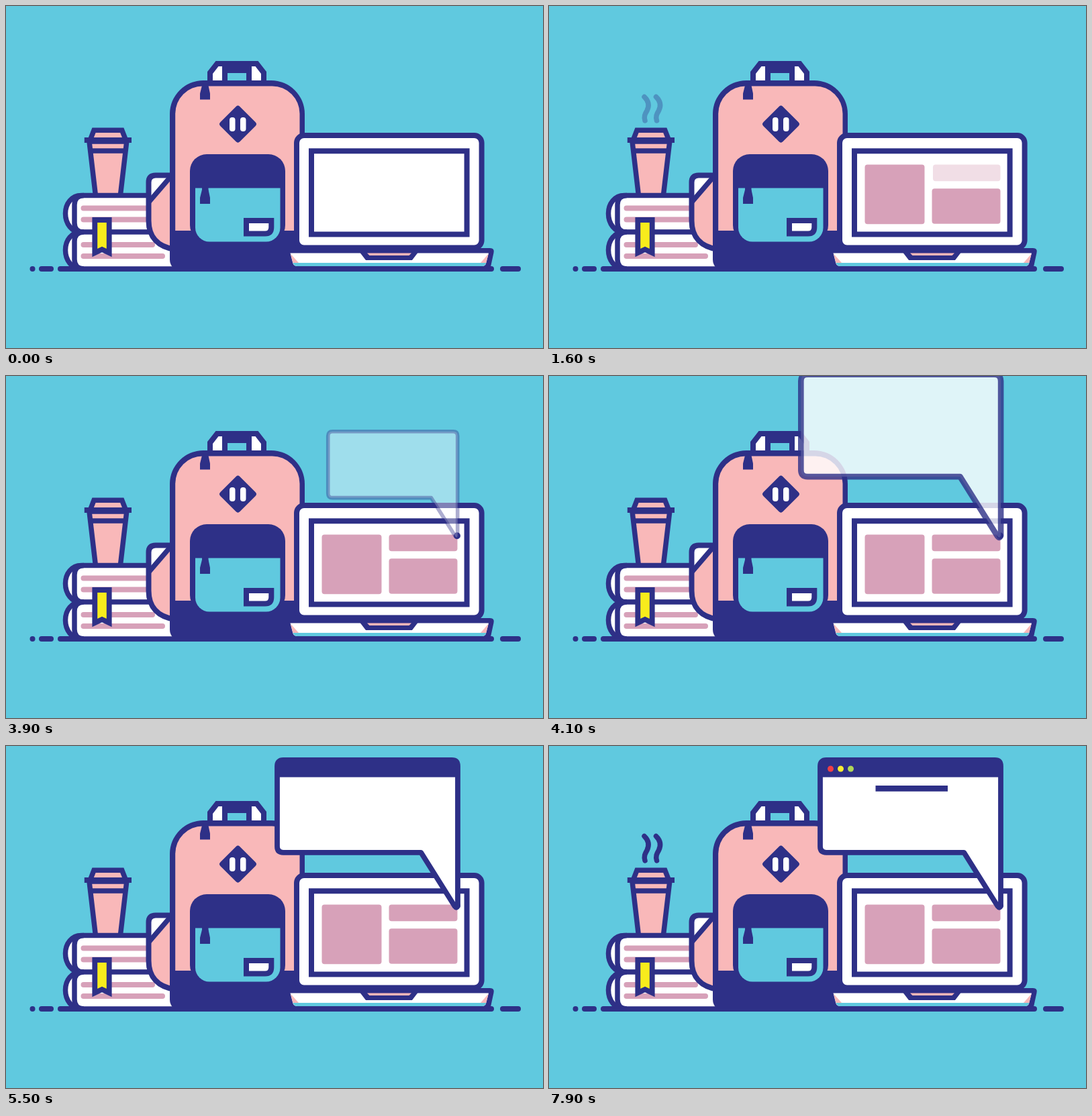
These frames come from a looping animation (800x510 px, 8000 ms). An HTML page with a canvas:

```html
<!DOCTYPE html>
<html lang="en">
<head>
<meta charset="utf-8">
<title>Study desk</title>
<style>
html, body { margin: 0; width: 100%; height: 100%; overflow: hidden; background: #60c9df; }
canvas { display: block; }
</style>
</head>
<body>
<canvas id="stage" width="800" height="510"></canvas>
<script>
const ctx = document.getElementById('stage').getContext('2d');
const LOOP = 8000, STEP = 100;
const SKY = '#60c9df', NAVY = '#2e3087', PINK = '#f9b8b9', MAUVE = '#d7a1b9',
      WHITE = '#fff', YELLOW = '#f8ec1c';

// ---- drawing helpers ----
function shape(d, fill, stroke, width = 8, join = 'miter', cap = 'butt') {
  const p = new Path2D(d);
  if (fill) { ctx.fillStyle = fill; ctx.fill(p); }
  if (stroke) {
    ctx.strokeStyle = stroke;
    ctx.lineWidth = width;
    ctx.lineJoin = join;
    ctx.lineCap = cap;
    ctx.stroke(p);
  }
}

function box(x, y, w, h, r, fill, stroke, width = 8) {
  ctx.beginPath();
  ctx.roundRect(x, y, w, h, r);
  if (fill) { ctx.fillStyle = fill; ctx.fill(); }
  if (stroke) {
    ctx.strokeStyle = stroke;
    ctx.lineWidth = width;
    ctx.lineJoin = 'miter';
    ctx.stroke();
  }
}

function disc(x, y, r, fill) {
  ctx.beginPath();
  ctx.arc(x, y, r, 0, Math.PI * 2);
  ctx.fillStyle = fill;
  ctx.fill();
}

function bar(x1, x2, y, color, width = 8, cap = 'round') {
  shape(`M${x1} ${y}H${x2}`, null, color, width, 'round', cap);
}

// ---- timing helpers ----
const ramp = (t, start, dur) => Math.min(1, Math.max(0, (t - start) / dur));
const ease = (t, start, dur) => {
  const u = ramp(t, start, dur);
  return u * u * (3 - 2 * u);
};
// Grow from 0 to peak, then settle at 1.
const pop = (t, start, up, down, peak) =>
  peak * ease(t, start, up) - (peak - 1) * ease(t, start + up, down);

// Scale around (x, y) with some opacity.
function scaled(x, y, sx, sy, alpha, draw) {
  if (alpha <= 0 || sx <= 0 || sy <= 0) return;
  ctx.save();
  ctx.globalAlpha = alpha;
  ctx.translate(x, y);
  ctx.scale(sx, sy);
  ctx.translate(-x, -y);
  draw();
  ctx.restore();
}

// ---- still objects ----
function ground() {
  disc(39.5, 392, 4, NAVY);
  bar(53, 67, 392, NAVY);
  bar(81, 723, 392, NAVY);
  bar(740, 763, 392, NAVY);
}

function cup() {
  shape('M124 202L133.6 284H170.2L179.8 202Z', PINK, NAVY, 7.5);
  bar(123, 181, 216, NAVY, 7.5, 'butt');
  shape('M125.3 200L131 185.3H172.8L178.5 200Z', PINK, NAVY, 7.5);
  bar(116.8, 187, 200, NAVY, 8, 'butt');
}

function book(y) {
  shape(`M252 ${y}H112C98 ${y} 88.5 ${y + 12} 88.5 ${y + 27}S98 ${y + 55} 112 ${y + 55}H252Z`,
    WHITE, NAVY, 7.5);
  shape(`M116 ${y}Q102 ${y} 102 ${y + 14}V${y + 41}Q102 ${y + 55} 116 ${y + 55}`, null, NAVY, 7.5);
}

function books() {
  book(282.5);
  bar(115.5, 214, 301.5, MAUVE);
  bar(115.5, 214, 318.5, MAUVE);
  book(337);
  bar(115.5, 218, 356, MAUVE);
  bar(115.5, 233, 373, MAUVE);
  shape('M132.3 319H153.7V368L143 363L132.3 368Z', YELLOW, NAVY, 7.8);
}

function sidePocket() {
  const d = 'M250 252.5H223Q212.5 252.5 212.5 263V320C212.5 346 228 359 250 362.5Z';
  shape(d, WHITE);
  ctx.save();
  ctx.clip(new Path2D(d));
  shape('M207 299L250 249V370H207Z', PINK);
  shape('M207 299L250 249', null, NAVY, 7.5);
  ctx.restore();
  shape(d, null, NAVY, 8, 'round');
}

function zip(y) {
  shape(`M292 ${y}H301.5L304 ${y + 12}V${y + 21}H289V${y + 12}Z`, NAVY);
}

function backpack() {
  shape('M300 116V98L312.5 82H375.5L388 98V116Z', NAVY);
  shape('M308 112V101L316.5 90H322V112ZM380 112V101L371.5 90H366V112Z', WHITE);
  shape('M330 100H358V112H330Z', SKY);

  box(244, 111, 201, 285, [50, 50, 18, 18], NAVY);
  box(252.2, 119.5, 185.3, 215.5, [41, 41, 0, 0], PINK);
  zip(118.5);

  ctx.save();
  ctx.translate(345.5, 176.2);
  ctx.rotate(Math.PI / 4);
  box(-20.5, -20.5, 41, 41, 4, NAVY);
  ctx.restore();
  box(333, 166, 8.5, 21, 4, WHITE);
  box(349, 166, 8.5, 21, 4, WHITE);

  box(274, 221, 142, 130, [25, 25, 24, 24], NAVY);
  box(282, 271.5, 126.5, 80, [0, 0, 21, 21], SKY);
  zip(274);
  box(292, 270, 9.5, 5, 0, NAVY);
  shape('M358 320H395.3V330Q395.3 339.5 386 339.5H358Z', WHITE, NAVY);
}

function laptop() {
  shape('M418 361H721Q728 361 726.5 368L722 389Q720.5 396 714 396H430Z', NAVY);
  shape('M423.5 368.5H719L715 384Q714 388 709 388H434Q429 388 427.5 384Z', WHITE);
  shape('M427.5 383H715.3Q714 388 709 388H434Q429 388 427.5 383Z', SKY);
  shape('M424 369.5L436 383H427.5ZM718.7 369.5L707 383H715.3Z', PINK);
  shape('M526 366H615L605 379H536Z', NAVY);
  shape('M538 368.5H604L600.5 372H541.5Z', PINK);
  box(433, 193, 275.6, 167.5, 11, WHITE, NAVY);
  box(455, 216.3, 231.6, 124.2, 0, WHITE, NAVY);
}

// ---- moving parts ----
function steam(t, start, end) {
  const k = pop(t, start, 700, 300, 1.1);
  const alpha = ease(t, start, 700) * (1 - ease(t, end, 500));
  scaled(0, 175, 1, k, alpha, () => {
    for (const x of [0, 17.5]) {
      shape(`M${142 + x} 135.5C${150 + x} 143 ${149 + x} 150 ${146 + x} 156C${143 + x} 161 ${141 + x} 165 ${143 + x} 171`,
        null, NAVY, 7.5, 'round', 'round');
    }
  });
}

function panels(t) {
  scaled(471, 325.3, 1, pop(t, 0, 300, 400, 1.1), ease(t, 0, 600),
    () => box(470.5, 236.5, 89, 88.8, 4, MAUVE));
  scaled(571, 324.8, 1, pop(t, 300, 500, 500, 1.1), ease(t, 300, 1000),
    () => box(570.5, 272.3, 102, 52.5, 4, MAUVE));
  scaled(672.5, 249, pop(t, 1200, 500, 500, 1.1), 1, ease(t, 1200, 1000),
    () => box(570.5, 236.5, 102, 24.8, 4, MAUVE));
}

function popDot(t, start, x, y, r, peak, color) {
  const k = pop(t, start, 300, 200, peak);
  scaled(x, y, k, k, ease(t, start, 300), () => disc(x, y, r, color));
}

function bubble(t) {
  const k = pop(t, 3600, 500, 500, 1.107);
  const alpha = ease(t, 3600, 700);
  if (alpha <= 0) return;
  scaled(672, 239.5, k, k, alpha, () =>
    shape('M413 21H664Q673 21 673 30V238Q671.5 243 668.5 239L618.2 158.8H413Q404 158.8 404 149.8V30Q404 21 413 21Z',
      WHITE, NAVY, 7.8, 'round'));

  scaled(0, 24, 1, pop(t, 5000, 300, 200, 1.1), ease(t, 5000, 300),
    () => box(406, 24, 265, 22.5, 0, NAVY));

  popDot(t, 6000, 449.5, 34, 4.5, 1.4, '#b0d658');
  popDot(t, 6400, 434.5, 34, 4.5, 1.4, '#f8ec31');
  popDot(t, 6800, 419.5, 34, 4.5, 1.4, '#ef3e46');

  const w = 107.5 * ramp(t, 7500, 400);
  if (w > 0) box(486.5, 59, w, 8.8, 0, NAVY);
}

function render(t) {
  ctx.fillStyle = SKY;
  ctx.fillRect(0, 0, 800, 510);
  ground();
  cup();
  books();
  sidePocket();
  backpack();
  laptop();
  steam(t, 300, 1300);
  steam(t, 7000, 8000);
  panels(t);
  popDot(t, 2500, 672, 238.3, 5, 1.5, NAVY);
  bubble(t);
}

const origin = performance.now();
function tick() {
  const t = (performance.now() - origin) % LOOP;
  render(Math.floor(t / STEP) * STEP);
  requestAnimationFrame(tick);
}
tick();
</script>
</body>
</html>
```
